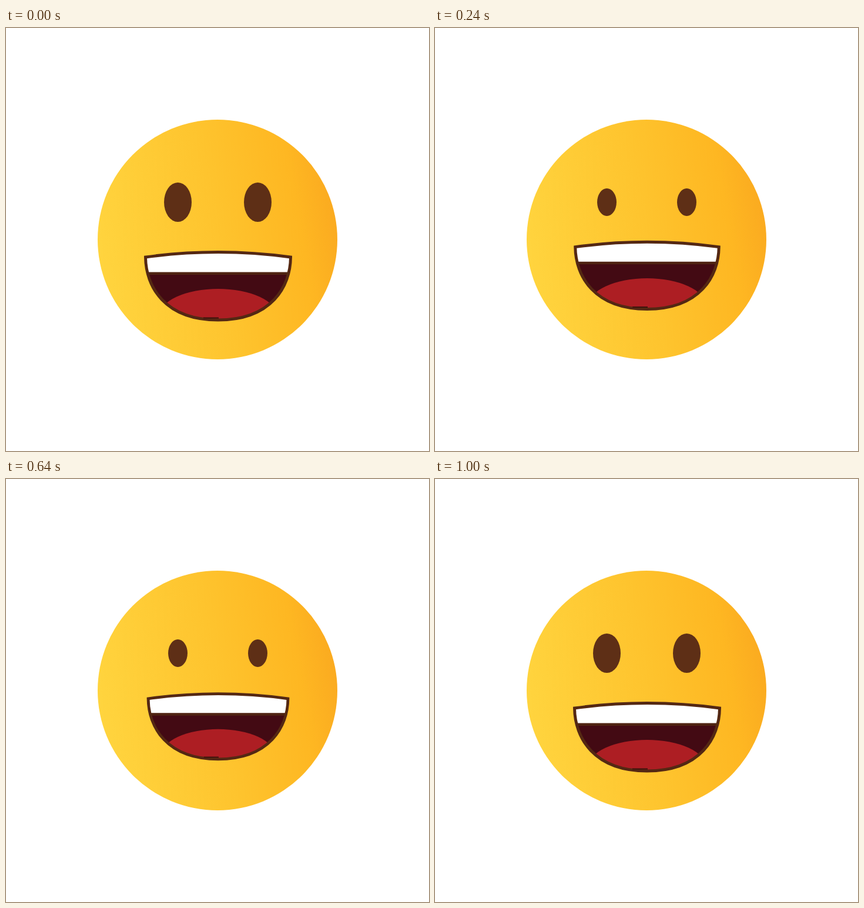
These frames come from a looping animation (720x720 px, 1.04 s). An HTML page:

```html
<!DOCTYPE html>
<html lang="en">
<head>
<meta charset="utf-8">
<title>Laughing face</title>
<style>
  html, body { margin: 0; width: 100%; height: 100%; overflow: hidden; background: #fff; }
  svg { display: block; width: 100%; height: 100%; }
</style>
</head>
<body>
<svg viewBox="0 0 720 720">
  <defs>
    <linearGradient id="skin" gradientUnits="userSpaceOnUse" x1="160" y1="395" x2="560" y2="325">
      <stop offset="0" stop-color="#ffd43e"/>
      <stop offset=".5" stop-color="#fec42e"/>
      <stop offset=".85" stop-color="#feb722"/>
      <stop offset="1" stop-color="#fbab20"/>
    </linearGradient>
    <path id="lips" d="M237.5 390Q361 373 484.5 390C484 440 452 497 361 497C270 497 238 440 237.5 390Z"/>
    <clipPath id="inside"><use href="#lips"/></clipPath>
  </defs>
  <circle cx="360" cy="360" r="204" fill="url(#skin)"/>
  <g fill="#5e2f16">
    <ellipse class="eye" cx="292.5" cy="296.5"/>
    <ellipse class="eye" cx="428.5" cy="296.5"/>
  </g>
  <g id="mouth">
    <g clip-path="url(#inside)">
      <rect x="230" y="370" width="262" height="135" fill="#430a13"/>
      <ellipse cx="361" cy="490" rx="100" ry="46" fill="#ad1e23"/>
      <rect x="230" y="370" width="262" height="46" fill="#fff"/>
      <path d="M230 417.7H492" stroke="#4f2312" stroke-width="4.6"/>
    </g>
    <use href="#lips" fill="none" stroke="#542813" stroke-width="5"/>
    <path d="M336 493.5H362" stroke="#3c130c" stroke-width="2"/>
  </g>
</svg>
<script>
  const LOOP = 1040, STEP = 40;

  // [time in ms, value]
  const eyeScale = [[0, 1], [200, .7], [760, .7], [960, 1]];
  const mouthY = [[0, 0], [180, -18], [360, -17.5], [520, -16.5], [640, -18], [760, -18], [960, 0]];
  const mouthScale = [[0, 1], [160, .99], [360, .99], [580, .955], [800, 1]];

  const eyes = document.querySelectorAll('.eye');
  const mouth = document.getElementById('mouth');

  function valueAt(keys, t) {
    const next = keys.findIndex(key => key[0] > t);
    if (next < 0) return keys[keys.length - 1][1];
    const [t0, v0] = keys[next - 1], [t1, v1] = keys[next];
    const p = (t - t0) / (t1 - t0);
    return v0 + (v1 - v0) * p * p * (3 - 2 * p);
  }

  function draw(now) {
    const t = Math.floor((now % LOOP) / STEP) * STEP;
    const e = valueAt(eyeScale, t);
    for (const eye of eyes) {
      eye.setAttribute('rx', 23.5 * e);
      eye.setAttribute('ry', 33.5 * e);
    }
    const y = 439.5 + valueAt(mouthY, t);
    mouth.setAttribute('transform',
      `translate(361 ${y}) scale(${valueAt(mouthScale, t)}) translate(-361 -439.5)`);
  }

  const start = performance.now();
  function tick() {
    draw(performance.now() - start);
    requestAnimationFrame(tick);
  }
  tick();
</script>
</body>
</html>
```
